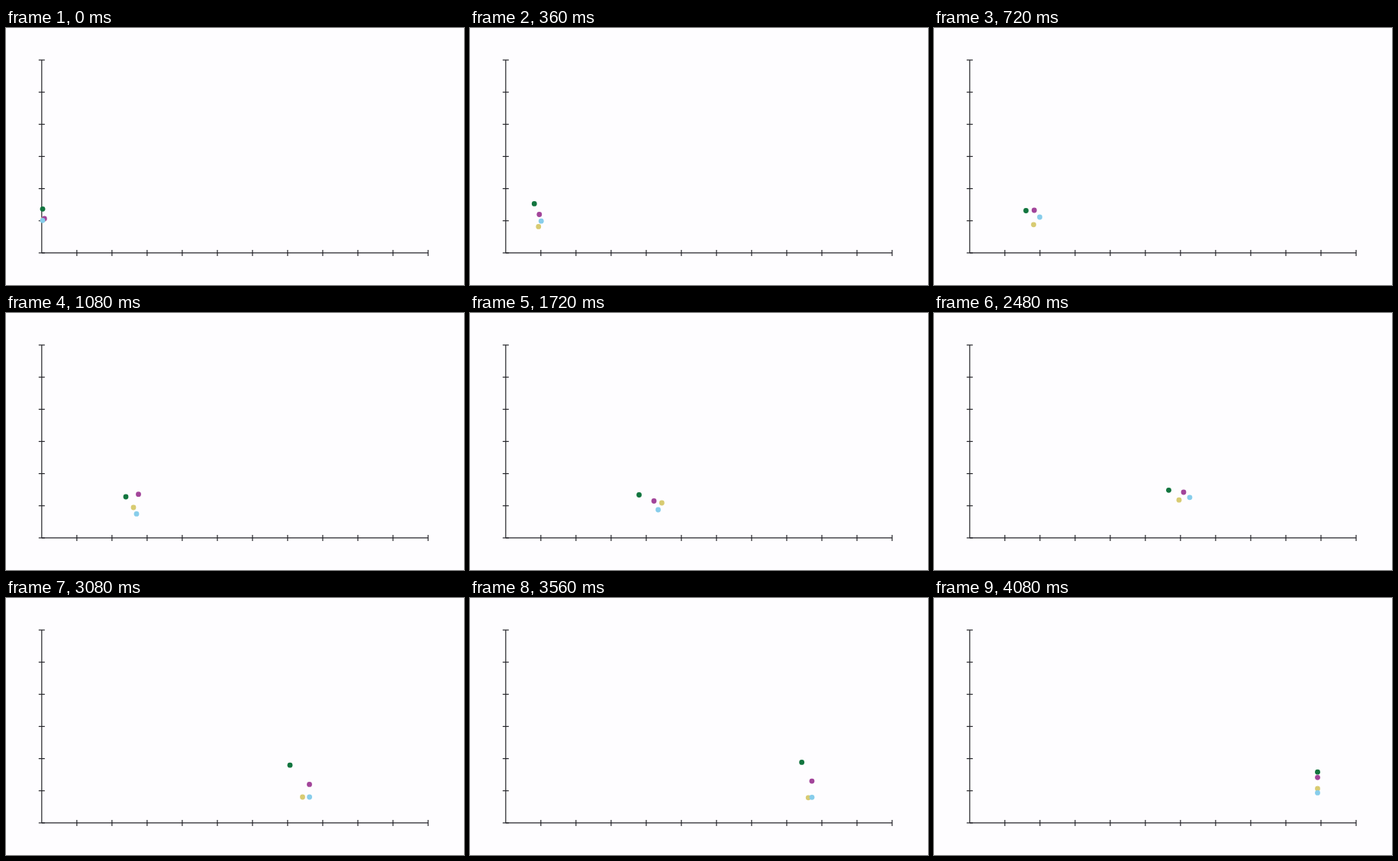
An HTML page with a canvas for the animation above (5000 ms loop, 600 by 337 pixels).

```html
<!DOCTYPE html>
<html lang="en">
<head>
<meta charset="utf-8">
<title>Drifting dots</title>
<style>
html, body { margin: 0; width: 100%; height: 100%; overflow: hidden; background: #fefdff; }
canvas { display: block; }
</style>
</head>
<body>
<canvas id="stage" width="600" height="337"></canvas>
<script>
const ctx = document.getElementById('stage').getContext('2d');
const LOOP = 5000, STEP = 40, RADIUS = 3.4;
const LEFT = 46.8, RIGHT = 553, TOP = 42, BOTTOM = 294.9, FINISH = 502.5;

// Moments at which all dots have a known place; sway bends the path between them
const times = [0, 720, 1080, 1720, 2480, 3080, 4080];
const END = times.at(-1);
const dots = [
  { color: '#12753f', sway: -8,
    x: [48, 120.5, 157, 221.5, 307.5, 372, FINISH],
    y: [237.3, 239.5, 241, 238.5, 232.3, 219.2, 228.2] },
  { color: '#d8cb72', sway: 6,
    x: [49, 130.5, 167, 251.3, 321, 388.5, FINISH],
    y: [251, 257.8, 255, 249, 245.2, 261, 250] },
  { color: '#a2449a', sway: 0,
    x: [50.3, 131.3, 173.5, 241, 327, 397.5, FINISH],
    y: [250, 239, 237.7, 246.5, 235, 244.4, 235.3] },
  { color: '#87cdeb', sway: 3,
    x: [48, 138.5, 171, 246.5, 335, 397.6, FINISH],
    y: [252.3, 248, 263.4, 258, 241.8, 261, 255.4] }
];

const mix = (a, b, u) => a + (b - a) * u;

function line(x1, y1, x2, y2) {
  ctx.beginPath();
  ctx.moveTo(x1, y1);
  ctx.lineTo(x2, y2);
  ctx.stroke();
}

function drawAxes() {
  ctx.strokeStyle = '#25252a';
  ctx.lineWidth = 1.2;
  line(LEFT, TOP, LEFT, BOTTOM);
  line(LEFT, BOTTOM, RIGHT, BOTTOM);
  for (let i = 0; i <= 6; i++) {
    const y = mix(TOP, BOTTOM, i / 6);
    line(LEFT - 4, y, LEFT + 4, y);
  }
  for (let i = 1; i <= 11; i++) {
    const x = mix(LEFT, RIGHT, i / 11);
    line(x, BOTTOM - 4, x, BOTTOM + 4);
  }
}

function drawDot({ color, sway, x, y }, t) {
  const i = Math.max(1, times.findIndex(time => time >= t));
  const u = (t - times[i - 1]) / (times[i] - times[i - 1]);
  const ease = u * u * (3 - 2 * u);
  const bend = sway * Math.sin(Math.PI * u) ** 2;
  ctx.fillStyle = color;
  ctx.beginPath();
  ctx.arc(mix(x[i - 1], x[i], u), mix(y[i - 1], y[i], ease) + bend, RADIUS, 0, Math.PI * 2);
  ctx.fill();
}

function draw(now) {
  const t = Math.min(END, Math.floor(now % LOOP / STEP) * STEP);
  ctx.fillStyle = '#fefdff';
  ctx.fillRect(0, 0, 600, 337);
  drawAxes();
  for (const dot of dots) drawDot(dot, t);
}

const start = performance.now();
function tick() {
  draw(performance.now() - start);
  requestAnimationFrame(tick);
}
tick();
</script>
</body>
</html>
```
